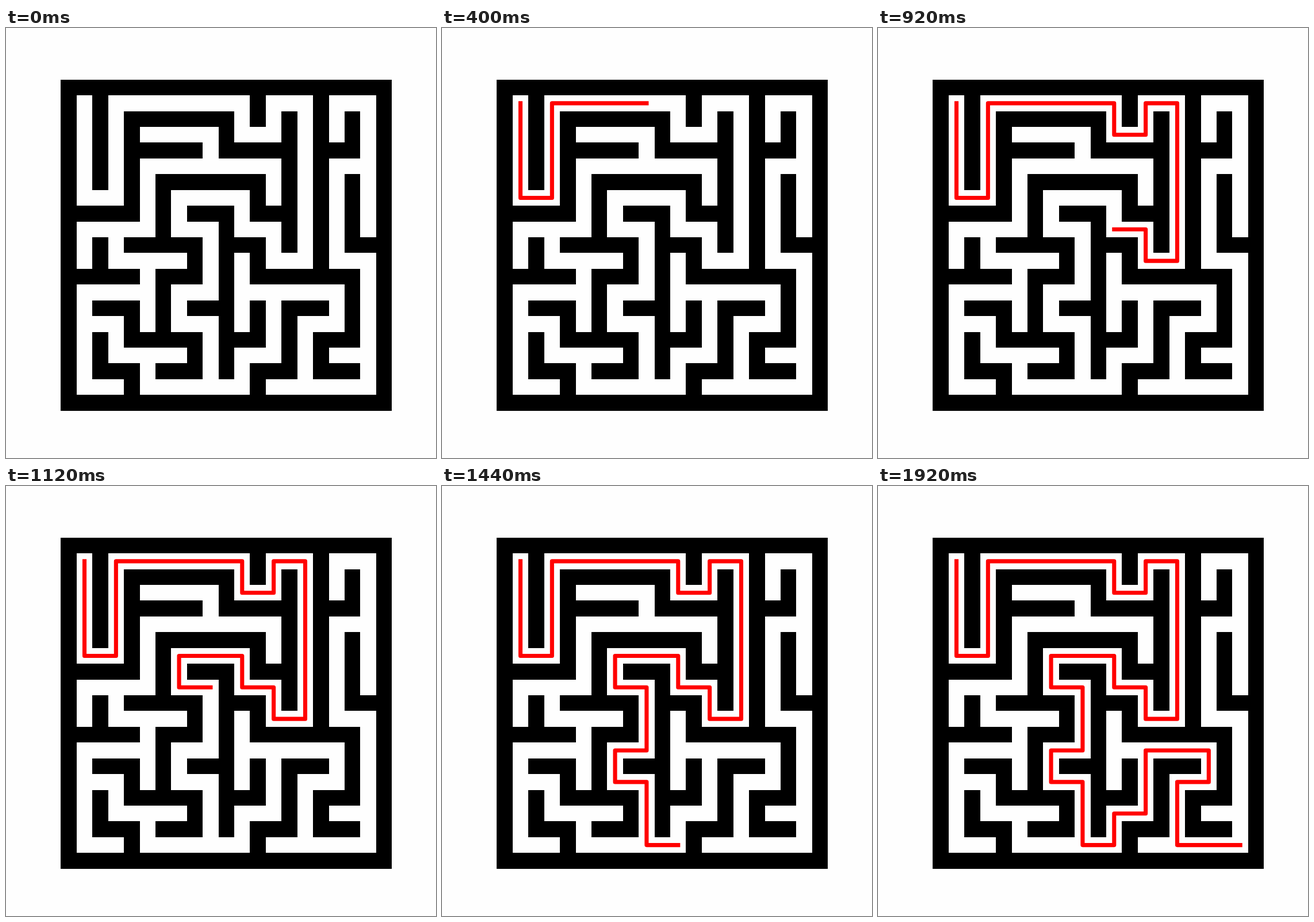
An HTML page with a canvas for the animation above (1940 ms loop, 748 by 748 pixels).

```html
<!DOCTYPE html>
<html lang="en">
<head>
<meta charset="utf-8">
<title>Maze</title>
<style>
html, body { margin: 0; width: 100%; height: 100%; overflow: hidden; background: #fefefe; }
canvas { display: block; }
</style>
</head>
<body>
<canvas id="stage" width="748" height="748"></canvas>
<script>
const ctx = document.getElementById('stage').getContext('2d');
const LEFT = 95.37, TOP = 89.76, CELL = 27.427;
const STEP = 20, LOOP = 1940;
const DIRS = { U: [0, -1], D: [0, 1], L: [-1, 0], R: [1, 0] };

// Each wall starts at a post; every letter walks to the next post.
const WALLS = [
  [0, 0, 'RRRRRRRRRRDDDDDDDDDDLLLLLLLLLLUUUUUUUUUU'],
  [1, 0, 'DDD'],
  [0, 4, 'RRUUURRRDRRUDDDD'],
  [2, 2, 'RR'],
  [6, 0, 'D'],
  [7, 4, 'LULLLDD'],
  [2, 5, 'RRDLDDLULRDRRDL'],
  [1, 5, 'DLRR'],
  [1, 8, 'DRD'],
  [4, 4, 'RDDDDD'],
  [4, 7, 'R'],
  [5, 5, 'RDRRRDDLDR'],
  [8, 0, 'DDDDDD'],
  [8, 2, 'RU'],
  [9, 3, 'DDR'],
  [5, 8, 'RU'],
  [8, 7, 'LDDLD']
];

// Each letter spans two cells.
const ROUTE = 'DDDRUUURRRRDRURDDDDDLULULLDRDDLDRDDRURUURRDLDDRR';

const edgeX = i => Math.round(LEFT + CELL * i);
const edgeY = j => Math.round(TOP + CELL * j);
const midX = i => LEFT + CELL * (i + 0.5);
const midY = j => TOP + CELL * (j + 0.5);

function fillCells(i0, j0, i1, j1) {
  const x = edgeX(i0), y = edgeY(j0);
  ctx.fillRect(x, y, edgeX(i1 + 1) - x, edgeY(j1 + 1) - y);
}

function drawWalls() {
  ctx.fillStyle = '#000';
  for (const [px, py, moves] of WALLS) {
    let x = px * 2, y = py * 2;
    for (const m of moves) {
      const nx = x + DIRS[m][0] * 2, ny = y + DIRS[m][1] * 2;
      fillCells(Math.min(x, nx), Math.min(y, ny), Math.max(x, nx), Math.max(y, ny));
      x = nx;
      y = ny;
    }
  }
}

function drawRoute(steps) {
  if (steps < 1) return;
  let x = 1, y = 1;
  ctx.beginPath();
  ctx.moveTo(midX(x), midY(y));
  for (let done = 0; done < steps; done += 2) {
    const [dx, dy] = DIRS[ROUTE[done / 2]];
    const len = Math.min(2, steps - done);
    x += dx * len;
    y += dy * len;
    ctx.lineTo(midX(x), midY(y));
  }
  ctx.strokeStyle = '#f00';
  ctx.lineWidth = 7.1;
  ctx.lineCap = 'square';
  ctx.lineJoin = 'round';
  ctx.stroke();
}

function draw(time) {
  ctx.fillStyle = '#fefefe';
  ctx.fillRect(0, 0, 748, 748);
  drawWalls();
  drawRoute(Math.floor((time % LOOP) / STEP));
}

let start = null;
function tick(now) {
  if (start === null) start = now;
  draw(Math.max(0, now - start));
  requestAnimationFrame(tick);
}
draw(0);
requestAnimationFrame(tick);
</script>
</body>
</html>
```
